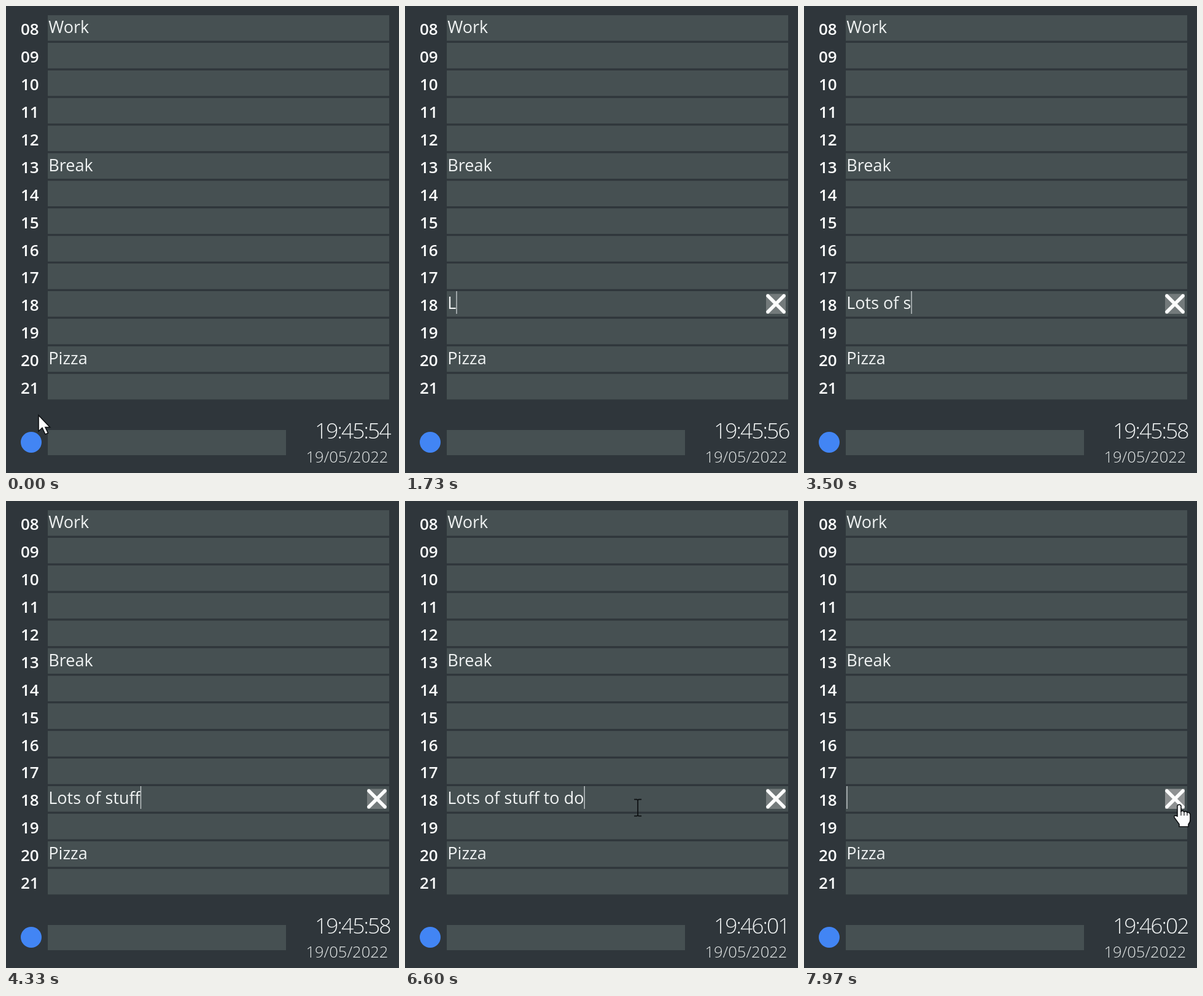
An HTML page with a canvas that plays this animation: 640x760 px, repeating every 8 s.

```html
<!DOCTYPE html>
<html lang="en">
<head>
<meta charset="utf-8">
<title>Day planner</title>
<style>
  html, body { margin: 0; width: 100%; height: 100%; overflow: hidden; background: #2f363b; }
  canvas { display: block; }
</style>
</head>
<body>
<canvas id="stage" width="640" height="760"></canvas>
<script>
const ctx = document.getElementById('stage').getContext('2d');
const LOOP = 8000;
const FONT = '"Open Sans", "Noto Sans", sans-serif';
const BG = '#2f363b', FIELD = '#465052', INK = '#f0f3f3', WHITE = '#fcfdfd', DARK = '#0e1113';
const ROW = { x: 68, y: 15, w: 556, h: 41.6, pitch: 44.9, count: 14 };
const ENTRIES = { 0: 'Work', 5: 'Break', 12: 'Pizza' };
const EDIT = 10;

// Typing: one time per character of the phrase
const PHRASE = 'Lots of stuff to do';
const KEYS = [1580, 1950, 2310, 2430, 2560, 2980, 3130, 3180, 3380, 3560,
              3800, 4200, 4270, 4900, 5000, 5110, 5220, 5380, 5520];
const FOCUS = 1310, CLEAR = 7890, BLINK = 530, WAKE = 6230;

// Pointer stops: time, x, y
const STOPS = [
  [30, 53, 666], [860, 127, 491], [WAKE, 127, 491],
  [7130, 589, 505], [7900, 611, 494]
];

const rowTop = i => ROW.y + i * ROW.pitch;
// Hand-like motion: quick start, long settle
const ease = p => 1 - (1 - p) ** 3 * (1 + 3 * p);

function pointerAt(t) {
  if (t <= STOPS[0][0]) return { x: STOPS[0][1], y: STOPS[0][2] };
  for (let i = 1; i < STOPS.length; i++) {
    const [t0, x0, y0] = STOPS[i - 1], [t1, x1, y1] = STOPS[i];
    if (t < t1) {
      const p = ease((t - t0) / (t1 - t0));
      return { x: x0 + (x1 - x0) * p, y: y0 + (y1 - y0) * p };
    }
  }
  const last = STOPS[STOPS.length - 1];
  return { x: last[1], y: last[2] };
}

function rowAt({ x, y }) {
  if (x < ROW.x || x > ROW.x + ROW.w) return -1;
  const i = Math.floor((y - ROW.y) / ROW.pitch);
  return i >= 0 && i < ROW.count && y - rowTop(i) <= ROW.h ? i : -1;
}

function onButton({ x, y }, row) {
  const top = rowTop(row) + 4.5;
  return x >= 588 && x <= 620 && y >= top && y <= top + 32.5;
}

function text(str, x, y, size, weight, color, spacing = 0) {
  ctx.font = `${weight} ${size}px ${FONT}`;
  ctx.letterSpacing = spacing + 'px';
  ctx.fillStyle = color;
  ctx.fillText(str, x, y);
}

function closeButton(row, hot) {
  const top = rowTop(row) + 4.5;
  ctx.fillStyle = hot ? '#8e9192' : '#737a7b';
  ctx.fillRect(588, top, 32, 32.5);
  ctx.strokeStyle = WHITE;
  ctx.lineWidth = 5.6;
  ctx.lineCap = 'round';
  ctx.beginPath();
  ctx.moveTo(591, top + 3.2);
  ctx.lineTo(617, top + 29.2);
  ctx.moveTo(617, top + 3.2);
  ctx.lineTo(591, top + 29.2);
  ctx.stroke();
}

const ARROW = new Path2D('M0 0V26L6 20.5L11 31L15.5 29L11 19.5H18.5Z');
const HAND = new Path2D('M-3 2Q0 -2 3 2V11Q6 9 8 12Q11 10 13 13Q17 12 18 16V25' +
  'Q18 29 15 32V36H0V32L-8 21Q-9 16 -3 19Z');
const BEAM = new Path2D('M-6 -13H-1.5L0 -12L1.5 -13H6M0 -12V13M-6 14H-1.5L0 13L1.5 14H6');

function pointer({ x, y }, kind) {
  ctx.save();
  ctx.translate(x, y);
  ctx.lineCap = 'butt';
  ctx.strokeStyle = DARK;
  if (kind === 'beam') {
    ctx.lineWidth = 1.8;
    ctx.stroke(BEAM);
  } else {
    const path = kind === 'hand' ? HAND : ARROW;
    ctx.fillStyle = WHITE;
    ctx.lineWidth = 1.6;
    ctx.fill(path);
    ctx.stroke(path);
    if (kind === 'hand') {
      ctx.lineWidth = 1.2;
      ctx.beginPath();
      for (const fx of [3, 8, 13]) {
        ctx.moveTo(fx, 11);
        ctx.lineTo(fx, 18);
      }
      ctx.stroke();
    }
  }
  ctx.restore();
}

function clock(t) {
  const s = 45 * 60 + 54 + Math.floor((t + 600) / 1000);
  const pad = n => String(n).padStart(2, '0');
  return `19:${pad(Math.floor(s / 60))}:${pad(s % 60)}`;
}

function caret(t, typed) {
  const since = Math.max(FOCUS, ...[...KEYS, CLEAR].filter(k => k <= t));
  if (Math.floor((t - since) / BLINK) % 2) return;
  ctx.font = `400 27px ${FONT}`;
  ctx.letterSpacing = '0px';
  ctx.fillStyle = '#c3c9ca';
  ctx.fillRect(69.3 + ctx.measureText(typed).width, rowTop(EDIT), 1.4, 37);
}

function draw(t) {
  ctx.fillStyle = BG;
  ctx.fillRect(0, 0, 640, 760);

  const typed = t < CLEAR ? PHRASE.slice(0, KEYS.filter(k => k <= t).length) : '';
  const pos = pointerAt(t);
  const hidden = t >= KEYS[0] && t < WAKE;
  const hover = rowAt(pos);
  const active = t >= FOCUS ? EDIT : hover;
  const hot = active >= 0 && onButton(pos, active);

  for (let i = 0; i < ROW.count; i++) {
    const top = rowTop(i);
    ctx.fillStyle = FIELD;
    ctx.fillRect(ROW.x, top, ROW.w, ROW.h);
    text(String(i + 8).padStart(2, '0'), 24, top + 32.3, 26, 600, WHITE);
    text(i === EDIT ? typed : ENTRIES[i] || '', 69.3, top + 29.2, 27, 400, INK);
  }
  if (active >= 0) closeButton(active, hot);
  if (t >= FOCUS) caret(t, typed);

  // Search bar and its badge
  ctx.fillStyle = FIELD;
  ctx.fillRect(68, 690, 388, 41);
  ctx.fillStyle = '#4285f4';
  ctx.beginPath();
  ctx.arc(41, 710, 17, 0, Math.PI * 2);
  ctx.fill();

  text(clock(t), 503, 703.5, 35.5, 300, INK, -2);
  text('19/05/2022', 488.5, 743, 25.5, 300, '#e4e8e8');

  if (!hidden) pointer(pos, hot ? 'hand' : hover >= 0 ? 'beam' : 'arrow');
}

function loop() {
  draw(performance.now() % LOOP);
  requestAnimationFrame(loop);
}
loop();
</script>
</body>
</html>
```
